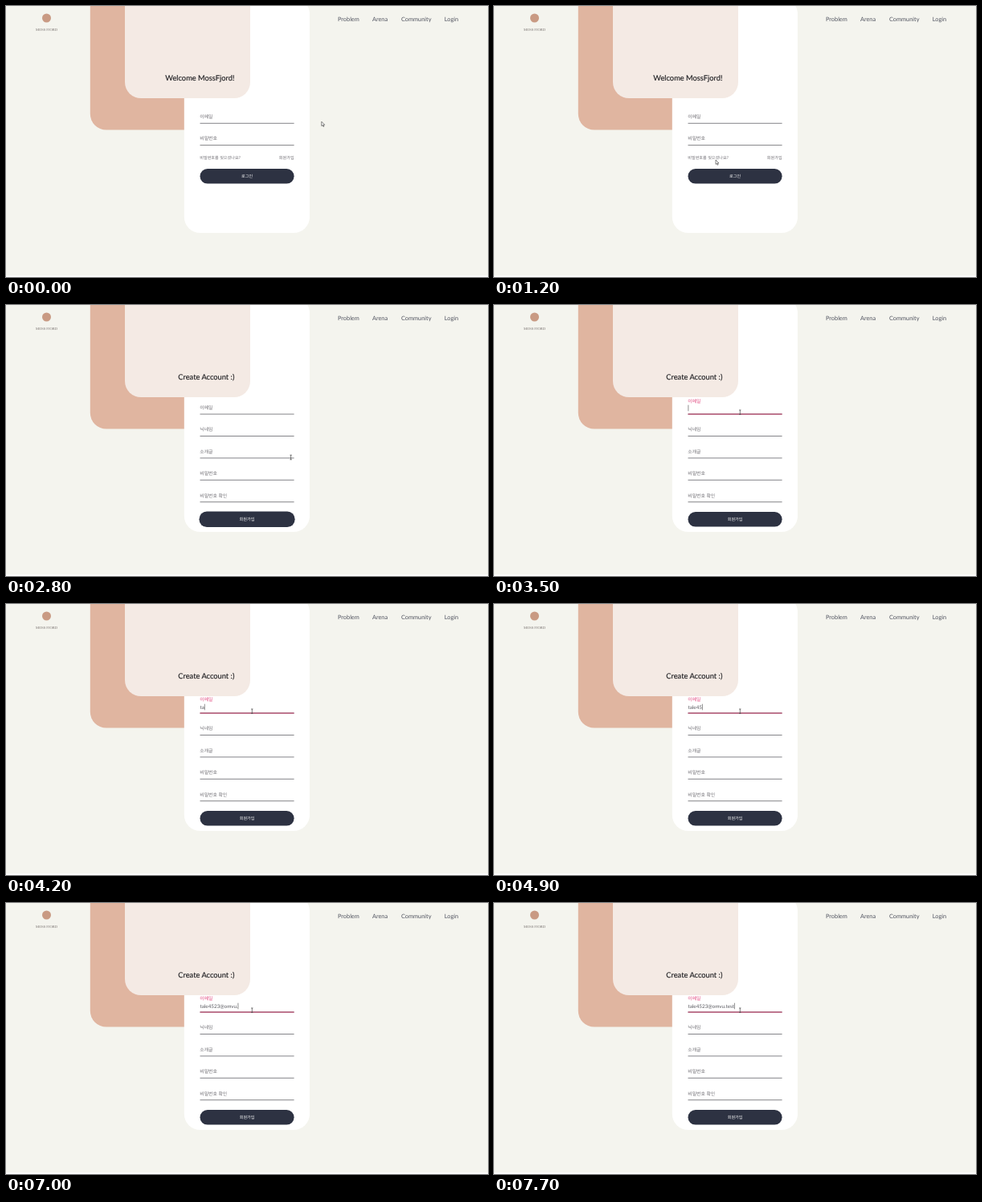
These frames come from a looping animation (600 px wide and 338 px high, 8000 ms). An HTML page:

```html
<!DOCTYPE html>
<html lang="ko">
<head>
<meta charset="utf-8">
<title>Sign up</title>
<style>
  html, body { margin: 0; width: 100%; height: 100%; overflow: hidden; background: #f4f4ee; }
  svg { display: block; width: 100%; height: 100%; text-rendering: geometricPrecision; }
  text { font-family: Lato, "Noto Sans CJK KR", sans-serif; white-space: pre; }
  .ko { font-family: "Noto Sans CJK KR", "Noto Sans CJK", sans-serif; fill: #6c6a70; }
  .nav { font-size: 7.35px; fill: #50535f; }
  .title { font-size: 9.3px; fill: #1f1f22; stroke: #1f1f22; stroke-width: .15px; text-anchor: end; }
  .brand { font-family: "Liberation Serif", serif; font-size: 4.5px; fill: #77706e; text-anchor: middle; }
  .cta { fill: #fff; font-weight: 500; text-anchor: middle; }
  .rule { stroke: #77777b; stroke-width: .9; }
  .typed { font-size: 6.3px; fill: #5a5a60; }
</style>
</head>
<body>
<svg viewBox="0 0 600 338" preserveAspectRatio="none">
  <rect width="600" height="338" fill="#f4f4ee"/>
  <rect y="336.4" width="600" height="2" fill="#fff"/>
  <rect x="104.8" y="-40" width="156" height="194.5" rx="20" fill="#e0b5a0"/>
  <rect x="221.8" y="-10" width="156.2" height="293" rx="20" fill="#fff"/>
  <g id="login"></g>
  <g id="signup"></g>
  <rect x="148" y="-40" width="156" height="155" rx="20" fill="#f4eae4"/>
  <text id="title" class="title" x="284.4" y="92.9"></text>
  <circle cx="50.5" cy="15" r="5.5" fill="#c99a83"/>
  <text class="brand" x="50.5" y="31.3">MOSS FJORD</text>
  <g id="nav"></g>
  <g id="cursor">
    <path id="arrow" d="M0 0V5.4L1.3 4.3L2.2 6.3L3.1 5.9L2.2 4H3.9Z" fill="#fff" stroke="#333" stroke-width=".6"/>
    <path id="hand" d="M-.6 .3Q0 -.4 .6 .3V2.6L3 3.1Q3.7 3.4 3.5 4.4L2.8 6.8H-.6L-2.6 4.2Q-2.2 3.2 -1.3 3.9L-.6 4.4Z" fill="#fff" stroke="#333" stroke-width=".6"/>
    <path id="beam" d="M-1.2 -2.8H1.2M0 -2.8V2.8M-1.2 2.8H1.2" fill="none" stroke="#444" stroke-width=".7"/>
  </g>
</svg>
<script>
const $ = id => document.getElementById(id);
const LOOP = 8000, STEP = 100, SIGNUP = 2800, LEFT = 241.5, RIGHT = 358.6;
const EMAIL = 'tale4523@omvu.test';

// time at which each character of the address appears
const KEYS = [3900, 4200, 4400, 4700, 4900, 4900, 5100, 5300, 5600,
              6200, 6300, 6500, 6700, 7000, 7200, 7400, 7500, 7700];

// time, x, y, shape of the pointer
const PATH = [
  [0, 392.8, 144.2, 'arrow'], [799, 392.8, 144.2, 'arrow'],
  [800, 388.6, 144.4, 'arrow'], [900, 388.6, 144.4, 'arrow'],
  [1000, 372, 150, 'arrow'], [1200, 276, 192, 'arrow'],
  [1300, 247, 198, 'arrow'], [1400, 284, 176, 'arrow'],
  [1500, 326.5, 148, 'beam'], [1600, 326.5, 148, 'beam'],
  [1700, 331, 145, 'beam'], [1800, 338, 152, 'arrow'],
  [1900, 346, 170, 'beam'], [2000, 351, 183, 'arrow'],
  [2100, 353.8, 188, 'hand'], [2799, 353.8, 188, 'hand'],
  [2800, 354.6, 190, 'beam'], [2900, 350, 184, 'beam'],
  [3100, 326, 156, 'beam'], [3300, 306.3, 133.8, 'beam']
];

const clamp = v => Math.max(0, Math.min(1, v));
const easeOut = v => 1 - (1 - clamp(v)) ** 2.2;

// Korean text, vertically centred on cy
const ko = (s, x, cy, size, attrs = 'class="ko"') =>
  `<text ${attrs} x="${x}" y="${cy + .38 * size}" font-size="${size}">${s}</text>`;
const rule = y => `<path class="rule" d="M${LEFT} ${y}H${RIGHT}"/>`;
const field = (s, y, id = '') => `<g id="${id}">${ko(s, LEFT - .2, y - 8.4, 5.85)}</g>` + rule(y);
const button = (s, y, id) => `<g id="${id}">
  <rect x="${LEFT}" y="${y}" width="${RIGHT - LEFT}" height="18.6" rx="9.3" fill="#2d3242"/>
  ${ko(s, 300.1, y + 9.1, 5.1, 'class="ko cta" style="fill:#fff"')}</g>`;

$('login').innerHTML =
  field('이메일', 146.3) + field('비밀번호', 173.6) +
  ko('비밀번호를 잊으셨나요?', LEFT - .2, 189, 5.1) +
  ko('회원가입', RIGHT, 189, 5.1, 'class="ko" text-anchor="end"') +
  button('로그인', 203, 'loginBtn');

$('signup').innerHTML =
  field('이메일', 136.1, 'mail') +
  ['닉네임', '소개글', '비밀번호', '비밀번호 확인']
    .map((s, i) => field(s, 163.5 + i * 27.4)).join('') +
  button('회원가입', 258, 'joinBtn') +
  `<path id="focus" d="M${LEFT} 136.1H${RIGHT}" stroke="#b8486e" stroke-width="1.3"/>
   <text id="typed" class="typed" x="${LEFT}" y="131"></text>
   <path id="caret" d="M0 124.7V132.3" stroke="#444" stroke-width=".6"/>`;

$('nav').innerHTML = [['Problem', 413], ['Arena', 456], ['Community', 492], ['Login', 545.8]]
  .map(([s, x]) => `<text class="nav" x="${x}" y="19">${s}</text>`).join('');

const show = (el, on) => el.style.display = on ? '' : 'none';
const scaleAt = (x, y, sx, sy) => `translate(${x} ${y}) scale(${sx} ${sy}) translate(${-x} ${-y})`;
const mailLabel = $('mail').firstElementChild;

function movePointer(t) {
  let i = PATH.length - 1;
  while (PATH[i][0] > t) i--;
  const [t0, x0, y0, shape] = PATH[i];
  const [t1, x1, y1] = PATH[i + 1] || [t0 + 1, x0, y0];
  const k = clamp((t - t0) / (t1 - t0));
  $('cursor').setAttribute('transform', `translate(${x0 + (x1 - x0) * k} ${y0 + (y1 - y0) * k})`);
  for (const id of ['arrow', 'hand', 'beam']) show($(id), id === shape);
}

function draw(t) {
  const joined = t >= SIGNUP;
  show($('login'), !joined);
  show($('signup'), joined);
  $('title').textContent = joined ? 'Create Account :)' : 'Welcome MossFjord!';
  movePointer(t);
  if (!joined) return;

  const grow = 1 + .018 * (1 - easeOut((t - SIGNUP) / 200));
  $('joinBtn').setAttribute('transform', scaleAt(300, 267.3, grow, 1 + (grow - 1) * 3));

  const focused = t >= 3400;
  $('mail').setAttribute('transform', `translate(0 ${-9 * easeOut((t - 3370) / 210)})`);
  mailLabel.style.fill = focused ? '#e0487f' : '';
  show($('focus'), focused);
  $('focus').setAttribute('transform', scaleAt(300, 136, easeOut((t - 3300) / 200), 1));

  const typed = $('typed');
  typed.textContent = EMAIL.slice(0, KEYS.filter(k => k <= t).length);
  show($('caret'), focused);
  const end = typed.textContent ? typed.getComputedTextLength() : 0;
  $('caret').setAttribute('transform', `translate(${LEFT + .4 + end} 0)`);
}

const start = performance.now();
function tick() {
  const t = (performance.now() - start) % LOOP;
  draw(Math.floor(t / STEP) * STEP);
  requestAnimationFrame(tick);
}
tick();
</script>
</body>
</html>
```
